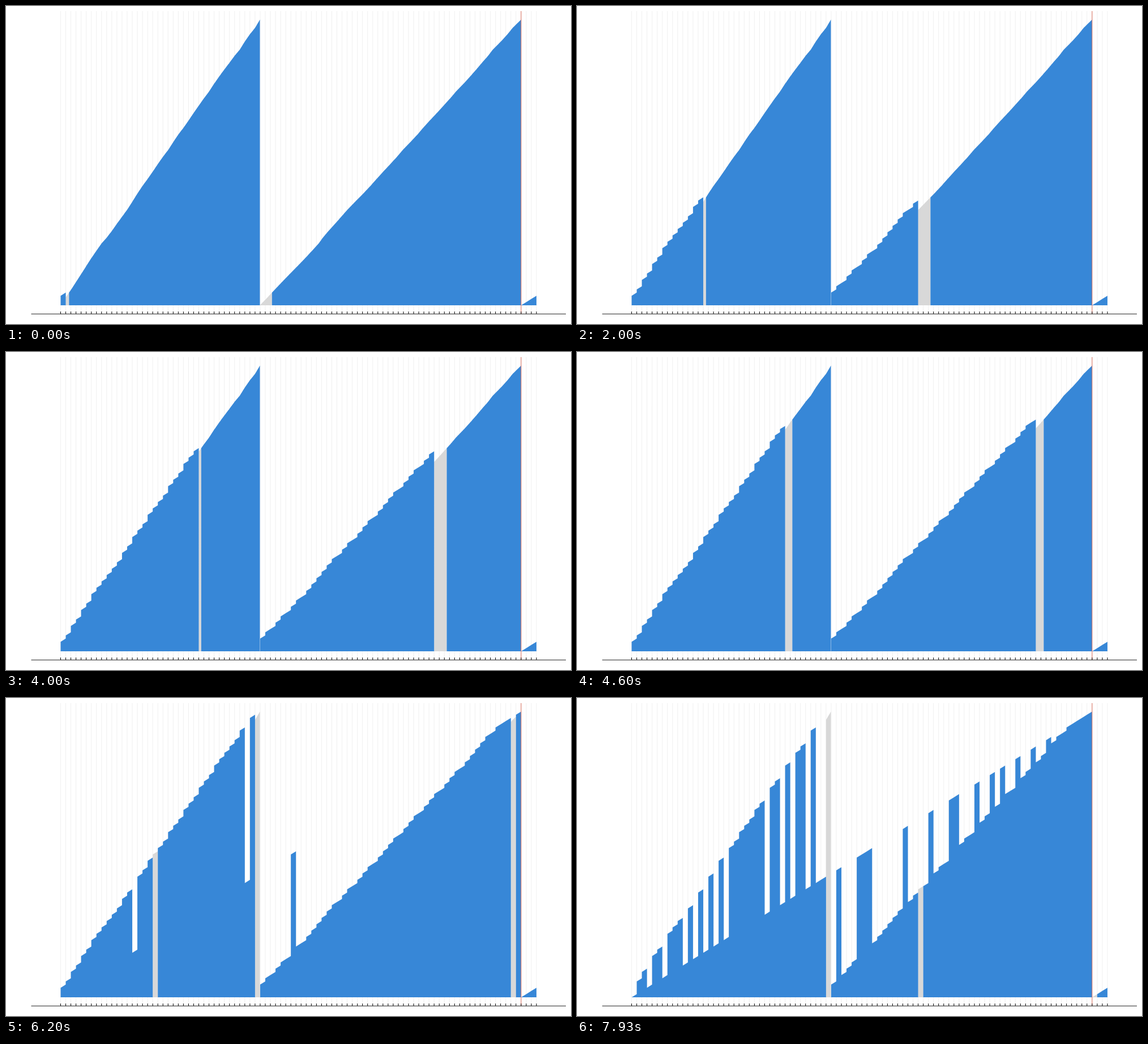
These frames come from a looping animation (998x561 px, 8000 ms). An HTML page with a canvas:

```html
<!DOCTYPE html>
<html lang="en">
<head>
<meta charset="utf-8">
<title>Block merge</title>
<style>
  html, body { margin: 0; width: 100%; height: 100%; overflow: hidden; background: #fff; }
  canvas { display: block; }
</style>
</head>
<body>
<canvas id="stage" width="998" height="561"></canvas>
<script>
const ctx = document.getElementById('stage').getContext('2d');

// All lengths and values below are measured in blocks.
const BLOCKS = 90, BUFFERS = 3, SPLIT = 38.95, FIRST_RIGHT = 39;
const LEFT = 96.5, BASE = 528, BLOCK_W = 9.037, BLOCK_H = 5.6;
const BLUE = '#3787d7', GRAY = '#d8d8d8';
const STEP_MS = 1000 / 15, LOOP_MS = 8000, FIRST_MOVE = 87;

// Value found at each whole block of the left run; the right run holds the rest.
const leftValues = [
  0, 2.5, 4.85, 7.3, 9.8, 12.35, 14.85, 17.2, 19.5, 21.3,
  23.4, 25.7, 27.9, 30.1, 32.6, 35.2, 37.6, 39.8, 42.1, 44.5,
  46.8, 48.9, 51.4, 53.8, 55.9, 58.2, 60.6, 62.9, 65.2, 67.3,
  69.8, 72.1, 74.3, 76.4, 78.6, 80.5, 83.1, 85.4, 87.4
];
const leftKnots = [...leftValues.map((value, i) => [i, value]), [SPLIT, BLOCKS]];
const rightKnots = leftKnots.map(([i, value]) => [SPLIT + value - i, value]);
const inverse = knots => knots.map(([i, value]) => [value, i]);
const leftHead = value => interpolate(inverse(leftKnots), value);

function interpolate(knots, x) {
  const k = Math.max(1, knots.findIndex(knot => knot[0] >= x));
  const [x0, y0] = knots[k - 1], [x1, y1] = knots[k];
  return y0 + (y1 - y0) * (x - x0) / (x1 - x0);
}

const px = i => LEFT + i * BLOCK_W;
const py = value => BASE - value * BLOCK_H;

function addArea(path, from, to, valueAt, samples = 8) {
  if (to - from < 1e-6) return;
  path.moveTo(px(from), BASE);
  for (let s = 0; s <= samples; s++) {
    const i = from + (to - from) * s / samples;
    path.lineTo(px(i), py(valueAt(i)));
  }
  path.lineTo(px(to), BASE);
  path.closePath();
}

function simulate(step) {
  const merged = Math.min(4 + step, BLOCKS);
  const slots = Array(BLOCKS + BUFFERS).fill(null);
  let left = 0, right = FIRST_RIGHT;

  // Each merged block goes to a buffer, then to the first fully consumed slot.
  for (let value = 0; value < merged; value++) {
    const slot = value < BUFFERS ? BLOCKS + value
      : leftHead(value) >= left + 1 ? left++ : right++;
    slots[slot] = { value, moved: false };
  }

  // Follow permutation cycles, starting from the last free slot.
  const lastFree = () => {
    let i = BLOCKS - 1;
    while (i >= 0 && slots[i] && !slots[i].moved) i--;
    return i;
  };
  let hole = lastFree();
  for (let move = step - FIRST_MOVE; move > 0 && hole >= 0; move--) {
    const source = slots.findIndex(s => s && !s.moved && s.value === hole);
    slots[source].moved = true;
    slots[hole] = { value: hole, moved: false };
    hole = source < BLOCKS ? source : lastFree();
  }
  return { slots, merged };
}

function line(x0, y0, x1, y1, color, width) {
  ctx.strokeStyle = color;
  ctx.lineWidth = width;
  ctx.beginPath();
  ctx.moveTo(x0, y0);
  ctx.lineTo(x1, y1);
  ctx.stroke();
}

function draw(step) {
  const { slots, merged } = simulate(step);
  const head = leftHead(merged);
  const runs = [
    { start: 0, end: SPLIT, head, knots: leftKnots },
    { start: SPLIT, end: BLOCKS, head: SPLIT + merged - head, knots: rightKnots }
  ];
  const blue = new Path2D(), gray = new Path2D();

  slots.forEach((slot, p) => {
    if (slot) {
      addArea(slot.moved ? gray : blue, p, p + 1, i => slot.value + i - p, 1);
      return;
    }
    for (const run of runs) {
      const from = Math.max(p, run.start), to = Math.min(p + 1, run.end);
      if (from >= to) continue;
      const cut = Math.min(to, Math.max(from, run.head));
      const valueAt = i => interpolate(run.knots, Math.min(i, run.end - 1e-9));
      addArea(gray, from, cut, valueAt);
      addArea(blue, cut, to, valueAt);
    }
  });

  ctx.fillStyle = '#fff';
  ctx.fillRect(0, 0, 998, 561);
  for (let p = 0; p <= slots.length; p++) line(px(p), 9, px(p), 543, '#f0f0f0', 1);
  ctx.fillStyle = GRAY;
  ctx.fill(gray);
  ctx.fillStyle = BLUE;
  ctx.fill(blue);
  line(px(BLOCKS), 9, px(BLOCKS), 543, '#d9614f', 0.9);
  for (let p = 0; p <= slots.length; p++) line(px(p), 539, px(p), 543, '#000', 1);
  line(44.5, 543.3, 989, 543.3, '#222', 1);
}

let shown = -1;
function tick() {
  const step = Math.floor((performance.now() % LOOP_MS + 3.4) / STEP_MS) % 120;
  if (step !== shown) draw(shown = step);
  requestAnimationFrame(tick);
}
tick();
</script>
</body>
</html>
```
